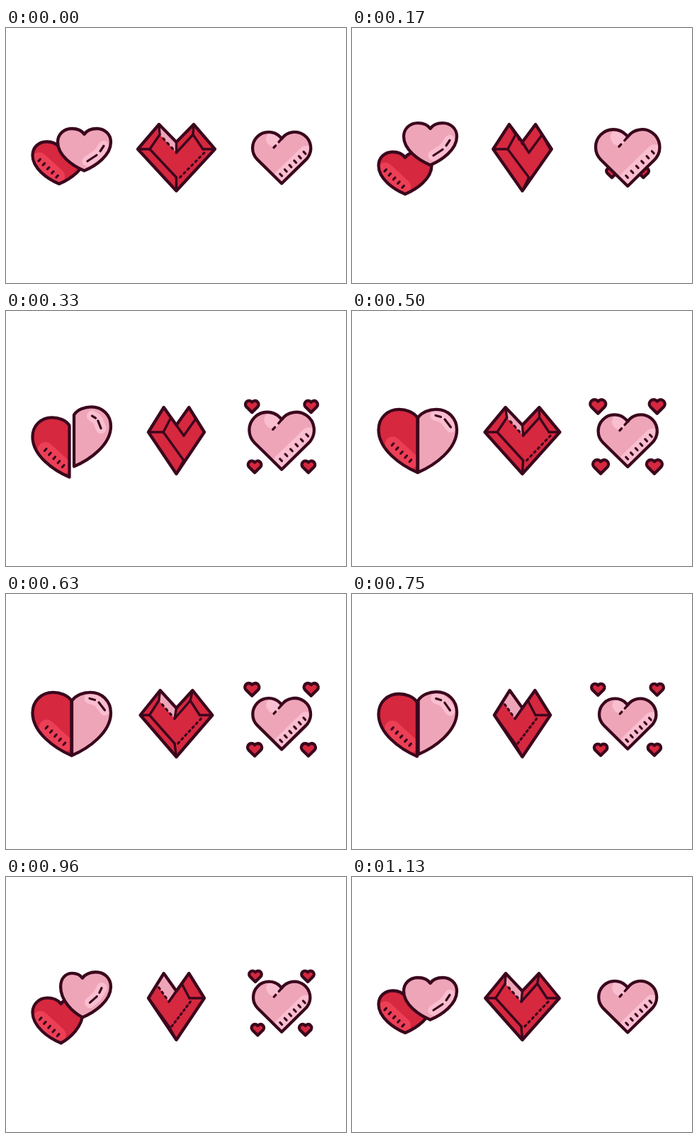
Animation, 480 px wide and 360 px high, one loop 1.18 s. Source, as an HTML page with a canvas:

```html
<!DOCTYPE html>
<html lang="en">
<head>
<meta charset="utf-8">
<title>Hearts</title>
<style>
html, body { margin: 0; width: 100%; height: 100%; overflow: hidden; background: #fff; }
canvas { display: block; }
</style>
</head>
<body>
<canvas id="stage" width="480" height="360"></canvas>
<script>
const ctx = document.getElementById('stage').getContext('2d');
const LOOP = 1180, FPS = 24, FRAMES = 28;
const RED = '#d6283f', RED_LIGHT = '#ec3f56';
const PINK = '#eea5b8', PINK_LIGHT = '#f9bed0', INK = '#3a071d';

const mix = (a, b, p) => a.map((v, i) => v + (b[i] - v) * p);
const clamp = v => Math.min(1, Math.max(0, v));

// Eased value from a list of [time, value] keys.
function key(t, keys) {
  let i = 0;
  while (i < keys.length - 2 && t >= keys[i + 1][0]) i++;
  const [t0, a] = keys[i], [t1, b] = keys[i + 1];
  const p = clamp((t - t0) / (t1 - t0));
  return a + (b - a) * (1 - Math.cos(Math.PI * p)) / 2;
}

function line(points, width = 3.4, color = INK) {
  ctx.beginPath();
  points.forEach(([x, y]) => ctx.lineTo(x, y));
  ctx.strokeStyle = color;
  ctx.lineWidth = width;
  ctx.stroke();
}

function polygon(points) {
  const path = new Path2D();
  points.forEach(([x, y]) => path.lineTo(x, y));
  path.closePath();
  return path;
}

function shape(path, fill, inside) {
  ctx.save();
  ctx.clip(path);
  ctx.fillStyle = fill;
  ctx.fill(path);
  if (inside) inside();
  ctx.restore();
  ctx.strokeStyle = INK;
  ctx.lineWidth = 4.3;
  ctx.stroke(path);
}

// Short ticks set along a line and turned by an angle against it.
function ticks([x0, y0], [x1, y1], count, size, turn = Math.PI / 2) {
  const angle = Math.atan2(y1 - y0, x1 - x0) + turn;
  const dx = Math.cos(angle) * size, dy = Math.sin(angle) * size;
  for (let i = 0; i < count; i++) {
    const [x, y] = mix([x0, y0], [x1, y1], i / (count - 1));
    line([[x - dx, y - dy], [x + dx, y + dy]], 3.2);
  }
}

// Heart from its middle, tip and height; a lobe of width 0 becomes a straight edge.
function lobedHeart(x, tip, h, left, right) {
  const path = new Path2D(), Y = v => tip - h + h * v;
  const L = v => x - left * v, R = v => x + right * v;
  const up = w => -.155 * clamp(w / 37.5);
  const lt = up(left), rt = up(right);
  path.moveTo(x, Y(0));
  path.bezierCurveTo(L(.1), Y(lt * .7), L(.3), Y(lt), L(.47), Y(lt));
  path.bezierCurveTo(L(.77), Y(lt), L(1), Y(0), L(1), Y(.22));
  path.bezierCurveTo(L(1), Y(.58), L(.43), Y(.87), x, tip);
  path.bezierCurveTo(R(.43), Y(.87), R(1), Y(.58), R(1), Y(.22));
  path.bezierCurveTo(R(1), Y(0), R(.77), Y(rt), R(.47), Y(rt));
  path.bezierCurveTo(R(.3), Y(rt), R(.1), Y(rt * .7), x, Y(0));
  path.closePath();
  return path;
}

// Two strokes of light on the pink heart, measured from its tip: whole and half.
const wholeMarks = [[4.5, -13.5], [17.5, -22], [22.5, -27.5], [27.5, -35]];
const halfMarks = [[46.5, -64], [38, -75], [32.5, -78.5], [25, -80.5]];

// Two hearts move apart, become halves and join, then go back.
function pair(t) {
  const stage = key(t, [[0, 0], [170, 1], [330, 2], [480, 3], [710, 3], [850, 2], [1000, 1], [1125, 0]]);
  const [apart, half, join] = [0, 1, 2].map(i => clamp(stage - i));
  const grow = 14.5 * half + 3 * join;
  const wide = 37.5 + grow, narrow = 37.5 * (1 - half), h = 51.5 + 1.47 * grow;

  const redX = 37.5 + wide, redTip = 220 + 14.5 * apart - 6.5 * join;
  const mx = redX - .41 * wide, my = redTip - 22 - .35 * grow;
  const from = [mx - 12.5, my - 11.5], to = [mx + 12.5, my + 11.5];
  shape(lobedHeart(redX, redTip, h, wide, narrow), RED, () => {
    line([from, to], 22, RED_LIGHT);
    ticks(from, to, 5, 1.9);
  });

  const pinkX = 148 - wide, pinkTip = 201.5 - 8 * apart + 26 * half + 8.5 * join;
  const marks = wholeMarks.map((m, i) => {
    const [x, y] = mix(m, halfMarks[i], .8 * half + .2 * join);
    return [pinkX + x, pinkTip + y];
  });
  shape(lobedHeart(pinkX, pinkTip, h, narrow, wide), PINK, () => {
    line(marks, 15, PINK_LIGHT);
    line(marks.slice(0, 2), 3.2);
    line(marks.slice(2), 3.2);
  });
}

// Six corners of the gem, clockwise from the left.
const ring = (x, k, peak, side, notch, tip) => [
  [x - side * k, 171], [x - peak[0] * k, peak[1]], [x, notch],
  [x + peak[0] * k, peak[1]], [x + side * k, 171], [x, tip]
];

function gem(turn) {
  const a = Math.abs(turn), k = 1 - .23 * a;
  const outer = ring(240.5, 1 - .275 * a, [24.5, 136], 54.5, 161, 230);
  const inner = ring(240.5 + 10.5 * turn, k, [23.5, 150.5], 37.5, 176, 211);
  shape(polygon(outer), RED, () => {
    if (turn < .5) {
      ctx.fillStyle = PINK;
      ctx.fill(polygon([outer[1], outer[2], inner[2], inner[1]]));
    }
    inner.forEach((p, i) => {
      line([outer[i], p]);
      if (i !== 1 && i !== 4) line([p, inner[(i + 1) % 6]]);
    });
    ticks(mix(inner[1], inner[2], .25), mix(inner[1], inner[2], .75), 3, 1.3, 0);
    const [x0, y0] = inner[5], [x1, y1] = inner[4];
    ticks([x0 + 6 * k, y0 - 1], [x1 + k, y1 + 6], 7, 1.3, 0);
  });
}

function roundHeart(x, y, k) {
  const path = new Path2D(), r = 22.5 * k, cy = y - 13 * k, notch = Math.PI / 5;
  path.arc(x - 18.2 * k, cy, r, Math.PI * .75, Math.PI * 2 - notch);
  path.arc(x + 18.2 * k, cy, r, Math.PI + notch, Math.PI * 2.25);
  path.lineTo(x, y + 36.5 * k);
  path.closePath();
  return path;
}

function burst(t, turn) {
  const cx = 389.2, cy = 182.7;
  const out = key(t, [[0, 0], [300, 1], [905, 1], [1150, 0]]);
  const size = .6 + .4 * out + key(t, [[300, 0], [500, .2], [750, 0]]);
  for (const sx of [-1, 1]) {
    for (const sy of [-1, 1]) {
      const end = [389 + sx * (39.8 - 1.9 * sy), 177.3 + sy * 42.5];
      shape(roundHeart(...mix([cx, cy], end, out), .225 * size), RED);
    }
  }

  const k = 1.01 + turn * (turn > 0 ? .115 : .023);
  const at = (x, y) => [cx + x * k, cy + y * k];
  shape(roundHeart(cx, cy, k), PINK, () => {
    line([at(-2, 28), at(34, -7)], 19 * k, PINK_LIGHT);
    line([at(-13, -26), at(-12, -24)], 18 * k, PINK_LIGHT);
    ticks(at(-1, 24.5), at(32, -6.5), 6, 2);
    line([at(0, -26), at(-4, -21.5)]);
    line([at(-8.5, -16.5), at(-11, -13.8)]);
  });
}

function draw(now) {
  const step = Math.floor((now % LOOP + 4) * FPS / 1000);
  const t = Math.min(FRAMES - 1, step) * 1000 / FPS;
  const turn = key(t, [[0, 0], [215, 1], [330, 1], [545, 0], [560, 0], [760, -1], [960, -1], [1180, 0]]);
  ctx.fillStyle = '#fff';
  ctx.fillRect(0, 0, 480, 360);
  ctx.lineCap = ctx.lineJoin = 'round';
  pair(t);
  gem(turn);
  burst(t, turn);
}

let start;
function tick(now) {
  start ??= now;
  draw(now - start);
  requestAnimationFrame(tick);
}
draw(0);
requestAnimationFrame(tick);
</script>
</body>
</html>
```
